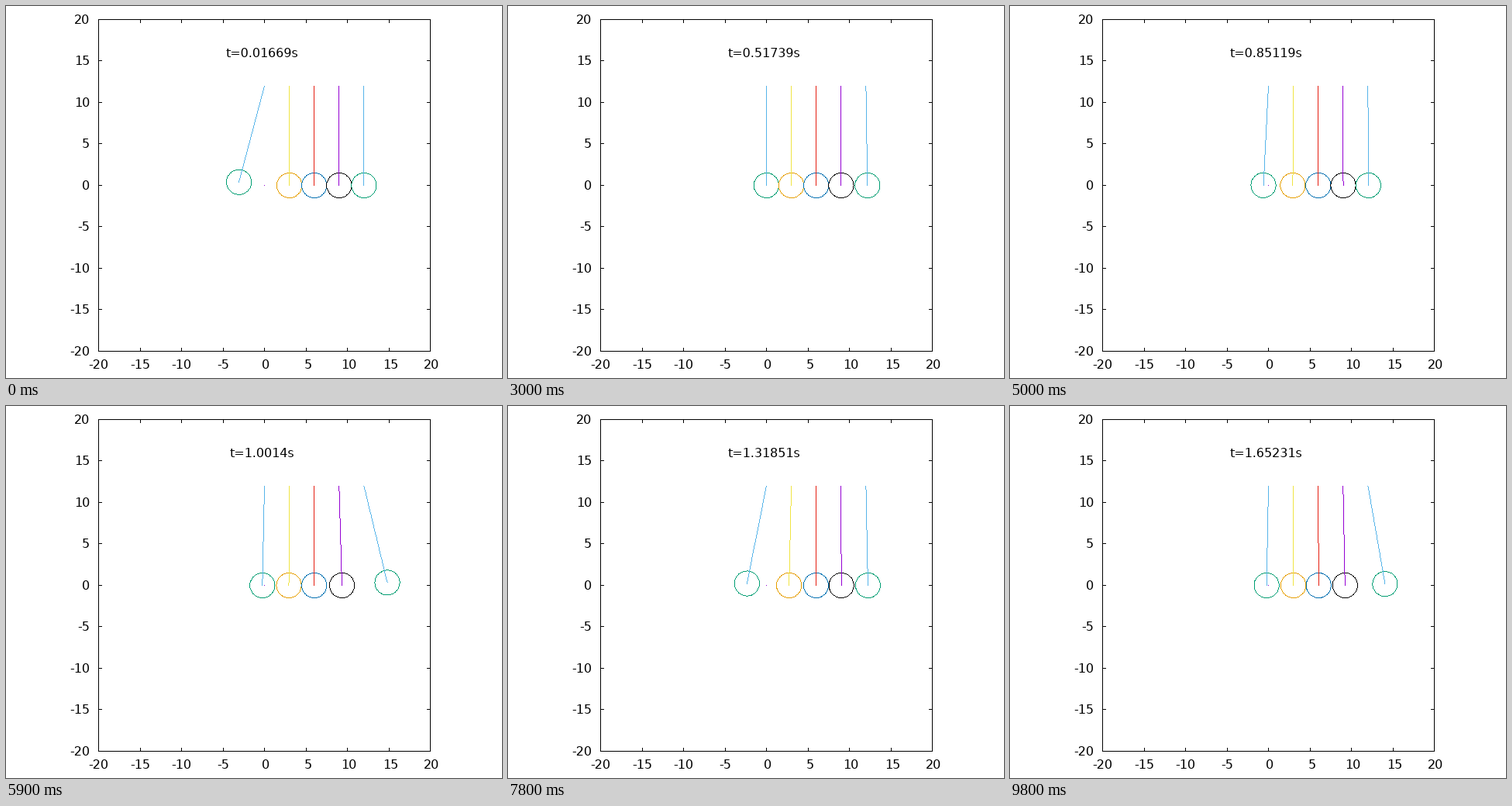
A matplotlib script that plays this animation: 640 px wide and 480 px high, repeating every 9900 ms.

```python
import math

import numpy as np
import matplotlib.pyplot as plt
from matplotlib.animation import FuncAnimation

W, H, DPI = 640, 480, 100
FRAMES, INTERVAL = 99, 100

# Cradle of steel balls, in centimetres and seconds
BALLS, LENGTH, RADIUS, GRAVITY = 5, 12.0, 1.5, 980.665
STIFFNESS = 1.2e10
FRAME_TIME, STEPS = 0.01669, 3338
DT = FRAME_TIME / STEPS

# Plot box, in pixels
LEFT, RIGHT, TOP, BOTTOM, UNIT = 119, 547, 17, 445, 10.7
TICK = 5
SAMPLES = 100

VIOLET, GREEN, SKY, ORANGE = "#9400d3", "#009e73", "#56b4e9", "#e69f00"
YELLOW, BLUE, RED, BLACK = "#f0e442", "#0072b2", "#e51e10", "#000000"
RINGS = [GREEN, ORANGE, BLUE, BLACK, GREEN]
STRINGS = [SKY, YELLOW, RED, VIOLET, SKY]


def rgb(color):
    return [int(color[i:i + 2], 16) for i in (1, 3, 5)]


def to_col(x):
    return np.floor(LEFT + UNIT * (x + 20) + 0.5).astype(int)


def to_row(y):
    return BOTTOM - np.floor(UNIT * (y + 20) + 0.5).astype(int)


def simulate():
    """Pendulum angles for every frame, with Hertzian contact between balls."""
    angle = [0.0] * BALLS
    angle[0] = -math.radians(15)
    speed = [0.0] * BALLS
    poses = []
    for _ in range(FRAMES):
        for _ in range(STEPS):
            sines = [math.sin(a) for a in angle]
            acc = [-GRAVITY / LENGTH * s for s in sines]
            for i in range(BALLS - 1):
                overlap = LENGTH * (sines[i] - sines[i + 1])
                if overlap > 0:
                    push = STIFFNESS * overlap ** 1.5 / LENGTH
                    acc[i] -= push
                    acc[i + 1] += push
            for i in range(BALLS):
                speed[i] += acc[i] * DT
                angle[i] += speed[i] * DT
        poses.append(list(angle))
    return poses


def stroke(canvas, x, y, color):
    """One-pixel curve through closely spaced samples, without antialiasing."""
    points = np.stack([to_row(y), to_col(x)])
    canvas[tuple(points)] = rgb(color)
    # Samples lie at most two pixels apart, so midpoints close every gap
    half = np.trunc(np.diff(points) / 2).astype(int)
    canvas[tuple(points[:, :-1] + half)] = rgb(color)


def draw_ring(canvas, x, y, color):
    a = np.linspace(0, 2 * np.pi, SAMPLES)
    stroke(canvas, x + RADIUS * np.cos(a), y + RADIUS * np.sin(a), color)


def draw_string(canvas, pivot, x, y, color):
    stroke(canvas, np.linspace(pivot, x, SAMPLES), np.linspace(LENGTH, y, SAMPLES), color)


def make_background():
    canvas = np.full((H, W, 3), 255, dtype=np.uint8)
    canvas[[TOP, BOTTOM], LEFT:RIGHT + 1] = 0
    canvas[TOP:BOTTOM + 1, [LEFT, RIGHT]] = 0
    for v in range(-20, 21, 5):
        col, row = to_col(v), to_row(v)
        canvas[TOP:TOP + TICK, col] = 0
        canvas[BOTTOM - TICK + 1:BOTTOM + 1, col] = 0
        canvas[row, LEFT:LEFT + TICK] = 0
        canvas[row, RIGHT - TICK + 1:RIGHT + 1] = 0
    canvas[to_row(0), to_col(0)] = rgb(VIOLET)
    return canvas


plt.rcParams["font.family"] = "DejaVu Sans"
plt.rcParams["font.size"] = 16 * 72 / DPI
plt.rcParams["text.hinting"] = "native"

fig = plt.figure(figsize=(W / DPI, H / DPI), dpi=DPI, facecolor="white")
ax = fig.add_axes([0, 0, 1, 1])
ax.axis("off")
background = make_background()
image = ax.imshow(background, interpolation="nearest", aspect="auto")
ax.set_xlim(-0.5, W - 0.5)
ax.set_ylim(H - 0.5, -0.5)

for v in range(-20, 21, 5):
    shift = 2 if v >= 0 else 0
    ax.text(to_col(v) + shift, 467.5, str(v), ha="center", va="baseline")
    ax.text(107.5, to_row(v) + 5.5, str(v), ha="right", va="baseline")
clock = ax.text(330, 65.5, "", ha="center", va="baseline")

poses = simulate()


def update(frame):
    canvas = background.copy()
    for i, a in enumerate(poses[frame]):
        pivot = 2 * RADIUS * i
        x = pivot + LENGTH * math.sin(a)
        y = LENGTH * (1 - math.cos(a))
        draw_ring(canvas, x, y, RINGS[i])
        draw_string(canvas, pivot, x, y, STRINGS[i])
    image.set_data(canvas)
    clock.set_text(f"t={(frame + 1) * FRAME_TIME:.6g}s")
    return image, clock


anim = FuncAnimation(fig, update, frames=FRAMES, interval=INTERVAL,
                     repeat=True, repeat_delay=0)
plt.show()
```
